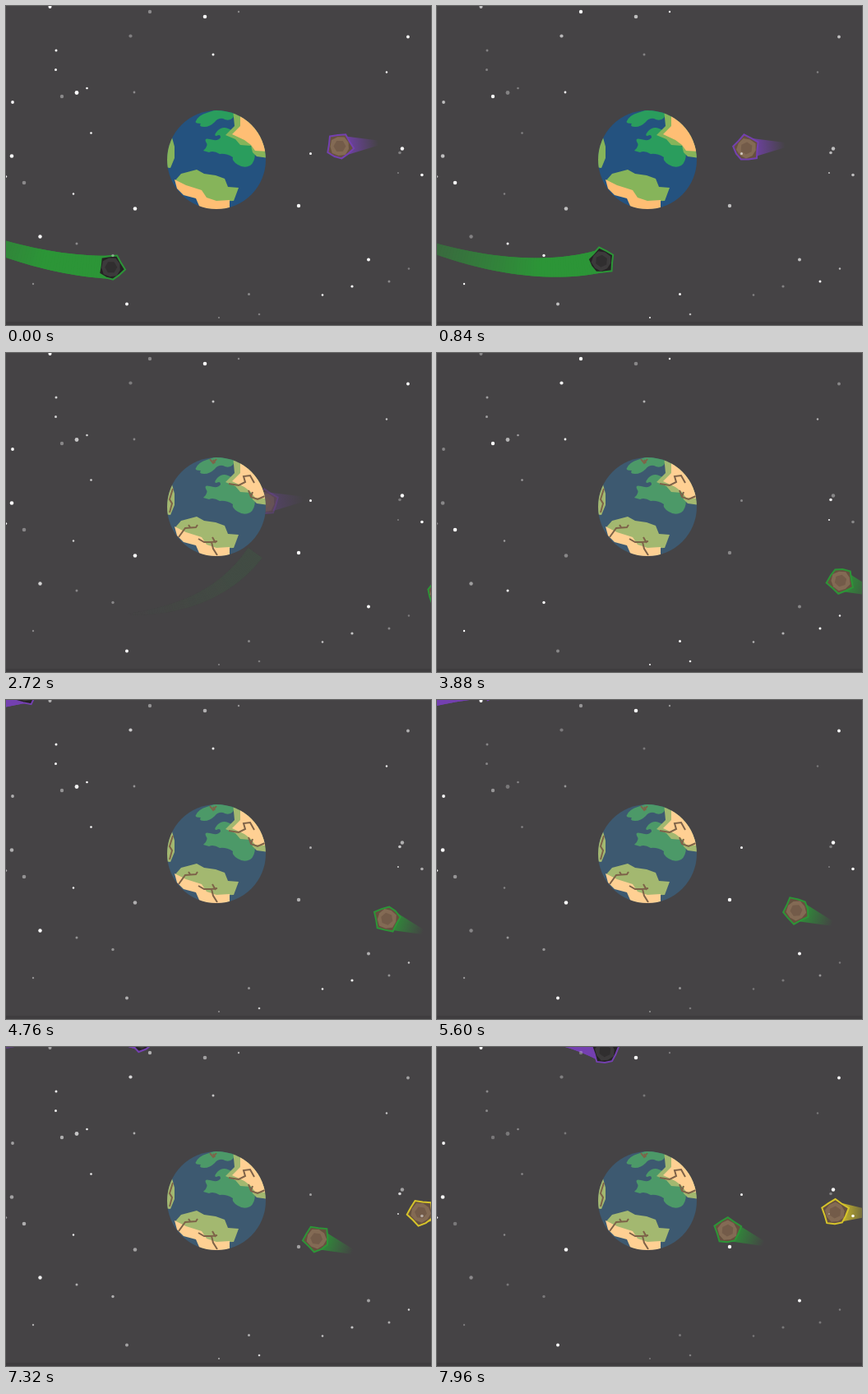
These frames come from a looping animation (517 px wide and 388 px high, 8 s). An HTML page with a canvas:

```html
<!DOCTYPE html>
<html lang="en">
<head>
<meta charset="utf-8">
<title>Asteroids and Earth</title>
<style>
  html, body { margin: 0; width: 100%; height: 100%; overflow: hidden; background: #454345; }
  canvas { display: block; width: 517px; height: 388px; }
</style>
</head>
<body>
<canvas id="stage" width="517" height="388"></canvas>
<script>
const ctx = document.getElementById('stage').getContext('2d');
const LOOP = 8000;
const SPACE = [69, 67, 69];
const GREEN = [44, 149, 55], PURPLE = [116, 64, 176], YELLOW = [214, 196, 42];
const DARK = ['#242223', '#3c3a3b', '#302e2f'];
const BROWN = ['#66503f', '#836a54', '#735b49'];

const clamp = v => Math.max(0, Math.min(1, v));
const ramp = (t, from, to) => clamp((t - from) / (to - from));
const lerp = (a, b, k) => a + (b - a) * k;
const mix = (a, b, k) => `rgb(${a.map((v, i) => Math.round(lerp(v, b[i], k)))})`;
const rgba = (c, a) => `rgba(${c},${a})`;

// Stars: groups share a twinkle; each star is [x, y, radius].
const starGroups = [
  { period: 2750, peak: 1050, stars: [[175, 7, 2.2], [283, 7, 1.2], [68, 110, 2.2], [156, 105, 1.4],
    [22, 215, 2.3], [86, 289, 1.5], [130, 303.5, 1.7], [33, 338, 1.2], [295.5, 350.5, 1.5],
    [466, 335, 1.5], [259, 379, 1]] },
  { period: 2650, peak: 200, stars: [[53.5, 1, 2], [242, 13, 2.3], [489, 37.5, 1.9], [8, 117, 1.9],
    [7, 182.5, 2.3], [157, 246.5, 2.3], [356, 243, 2.2], [482, 173.5, 2.2], [506, 205.5, 1.8],
    [441, 308.5, 2], [147, 362.5, 2], [370.5, 179.5, 1.5], [0, 207.5, 1.2]] },
  { period: 2400, peak: -150, stars: [[61, 54, 1.5], [60.5, 77.5, 1.5], [98.5, 100, 1.3],
    [103.5, 154.5, 1.3], [41.5, 280.5, 2.2], [82, 228.5, 1.2]] },
  { period: 2300, peak: -100, stars: [[252, 59, 1.5], [86, 105.5, 2.4], [463, 80.5, 1.2],
    [385, 351.5, 1.3], [421, 341, 1.6]] },
  { period: 2650, peak: 1525, stars: [[479, 178.5, 1.8], [477, 203, 1.1], [490, 319.5, 1.2],
    [308, 375, 1.3], [151.5, 36.5, 2.1]] }
];

function drawStars(t) {
  for (const { period, peak, stars } of starGroups) {
    const alpha = 0.64 + 0.36 * Math.cos((t - peak) / period * 2 * Math.PI);
    ctx.fillStyle = rgba([255, 255, 255], alpha);
    for (const [x, y, r] of stars) {
      ctx.beginPath();
      ctx.arc(x, y, r, 0, 7);
      ctx.fill();
    }
  }
}

// Earth: each land layer has a healthy and a damaged colour.
const OCEAN = [[36, 82, 127], [61, 89, 112]];
const FOREST = [[42, 157, 93], [76, 153, 104]];
const GRASS = [[134, 180, 90], [163, 184, 112]];
const SAND = [[255, 190, 116], [255, 208, 147]];
const land = [
  [FOREST, 'M231 140Q234 133 244 130L262 124L280 128L276 136Q271 141 264 137Q258 136 254 141Q248 147 241 147Q234 147 237 143Q229 143 231 140Z'],
  [FOREST, 'M240 176Q247 170 243 165Q241 160 248 162Q258 165 261 160Q261 155 256 158Q252 158 257 152Q263 146 270 149L279 153L296 168L303 178Q303 190 297 194Q290 198 282 193Q274 188 276 184Q268 179 260 180Q252 175 247 178Z'],
  [GRASS, 'M276 125L278 146L267 157L279 162L285 169L298 170L300 178L305 183L320 185L320 125Z'],
  [SAND, 'M285 125L285 146L275 156L290 163L298 169L303 176L320 177V125Z'],
  [GRASS, 'M202 160L205 171L205 185L200 197L192 196V165Z'],
  [GRASS, 'M206 212L213 204L232 199L241 204L255 206L266 210L270 220L283 221L277 237L246 238L222 224Z'],
  [SAND, 'M205 211L219 218L238 224L244 233L256 237L272 236L272 250L238 250L231 234L216 230L208 222Z']
].map(([tone, d]) => [tone, new Path2D(d)]);
const cracks = new Path2D('M271 159L283 161L291 157L289 150L297 149L302 158M295 167L298 175L306 178L315 174' +
  'M298 175L300 169M210 224L218 213L231 212L233 209M224 212L222 209M234 226L241 230L250 230L252 238L257 246' +
  'M250 230L257 229M251 224L255 231M203 165L199 178L202 183L199 194M248 129L252 134L256 129M252 130L254 134');

function drawEarth(t) {
  const damage = ramp(t, 1900, 2240);
  ctx.save();
  ctx.beginPath();
  ctx.arc(256, 187, 60, 0, 7);
  ctx.fillStyle = mix(...OCEAN, damage);
  ctx.fill();
  ctx.clip();
  for (const [tone, path] of land) {
    ctx.fillStyle = mix(...tone, damage);
    ctx.fill(path);
  }
  ctx.strokeStyle = rgba([126, 99, 73], ramp(t, 1880, 2060));
  ctx.lineWidth = 2;
  ctx.stroke(cracks);
  ctx.restore();
}

const ROCK_RADII = [18, 14.5, 17, 14, 18.5, 14.5, 16, 15, 17.5, 14];

function polygon(count, radius, turn) {
  ctx.beginPath();
  for (let i = 0; i < count; i++) {
    const a = turn + i / count * 2 * Math.PI;
    ctx.lineTo(radius(i) * Math.cos(a), radius(i) * Math.sin(a));
  }
  ctx.closePath();
}

function drawRock(x, y, t, tones, color, alpha = 1) {
  ctx.save();
  ctx.globalAlpha = alpha;
  ctx.translate(x, y);
  ctx.rotate(t * 0.042 * Math.PI / 180);
  ctx.lineWidth = 2;
  ctx.strokeStyle = rgba(color, 1);
  polygon(10, i => ROCK_RADII[i] * 0.94, -2.36);
  ctx.fillStyle = tones[0];
  ctx.fill();
  ctx.stroke();
  polygon(9, i => 11.5 + i % 2, 0.3);
  ctx.fillStyle = tones[1];
  ctx.fill();
  polygon(6, () => 7.5, 0);
  ctx.fillStyle = tones[2];
  ctx.fill();
  ctx.restore();
}

// Small asteroids drift along straight keyed paths with a short cone behind.
const drifters = [
  { color: PURPLE, tail: [47, -4], end: [2600, 2780],
    keys: [[0, 406, 170.5], [840, 376.5, 173], [2040, 337, 179], [2780, 313, 182]] },
  { color: GREEN, tail: [44, 16],
    keys: [[2440, 537, 295], [3880, 491, 277], [5600, 437, 256], [6560, 406.5, 245], [8000, 352, 222.5]] },
  { color: YELLOW, tail: [47, 1], keys: [[6300, 537, 202], [8000, 483, 201]] }
];

function along(keys, t) {
  const i = keys.findIndex(k => k[0] >= t);
  if (i < 0 || t < keys[0][0]) return null;
  const b = keys[i], a = keys[Math.max(0, i - 1)];
  const k = b === a ? 0 : (t - a[0]) / (b[0] - a[0]);
  return [lerp(a[1], b[1], k), lerp(a[2], b[2], k)];
}

function drawDrifter({ color, tail, keys, end }, t) {
  const pos = along(keys, t);
  if (!pos) return;
  const [x, y] = pos;
  const alpha = end ? 1 - ramp(t, ...end) : 1;
  const length = Math.hypot(...tail);
  ctx.save();
  ctx.globalAlpha = alpha;
  ctx.translate(x, y);
  ctx.rotate(Math.atan2(tail[1], tail[0]));
  const fade = ctx.createLinearGradient(8, 0, length, 0);
  fade.addColorStop(0, rgba(color, 0.9));
  fade.addColorStop(1, rgba(color, 0));
  ctx.fillStyle = fade;
  ctx.beginPath();
  ctx.moveTo(0, -13);
  ctx.lineTo(length, -3);
  ctx.lineTo(length, 3);
  ctx.lineTo(0, 13);
  ctx.fill();
  ctx.restore();
  drawRock(x, y, t, BROWN, color, alpha);
}

// Comets follow a cubic curve; progress is quadratic in time.
const comets = [
  { color: GREEN, curve: [[-170, 215], [0, 325], [215, 365], [303, 243]],
    start: 0, end: 3000, progress: t => 0.56 + 1.587e-4 * t + 2.795e-8 * t * t },
  { color: PURPLE, curve: [[-150, 50], [20, -28], [170, -55], [270, 55]],
    start: 3900, end: LOOP,
    progress: t => 0.45 + 1.2e-4 * (t - 5600) + 1.2e-8 * (t - 5600) ** 2 }
];

function curvePoint([a, b, c, d], u) {
  const v = 1 - u;
  return [0, 1].map(i =>
    v * v * v * a[i] + 3 * v * v * u * b[i] + 3 * v * u * u * c[i] + u * u * u * d[i]);
}

function drawComet({ color, curve, start, end, progress }, t) {
  if (t < start || t > end) return;
  const u = progress(t), head = Math.min(u, 1), tail = u - 0.6;
  const gone = start === 0 ? ramp(t, 2050, 2800) : 0;
  const steps = 90;
  const edge = i => {
    const at = lerp(tail, head, i / steps);
    const [x, y] = curvePoint(curve, at);
    const [nx, ny] = curvePoint(curve, at + 0.001);
    const len = Math.hypot(nx - x, ny - y);
    const half = 14 * clamp((at - tail) / 0.6) ** 0.7;
    const ox = -(ny - y) / len * half, oy = (nx - x) / len * half;
    return [x + ox, y + oy, x - ox, y - oy];
  };
  // Opaque slices overlap by one step, so no seams show.
  for (let i = 0; i < steps && tail < head; i++) {
    const a = edge(i), b = edge(Math.min(i + 2, steps));
    const strength = clamp(((i + 1) / steps) * 1.35) * (1 - gone);
    ctx.fillStyle = mix(SPACE, color, strength);
    ctx.beginPath();
    ctx.moveTo(a[0], a[1]);
    ctx.lineTo(b[0], b[1]);
    ctx.lineTo(b[2], b[3]);
    ctx.lineTo(a[2], a[3]);
    ctx.fill();
  }
  const alpha = start === 0 ? 1 - ramp(t, 1940, 2110) : 1;
  if (alpha > 0) drawRock(...curvePoint(curve, head), t, DARK, color, alpha);
}

function draw(t) {
  ctx.fillStyle = rgba(SPACE, 1);
  ctx.fillRect(0, 0, 517, 388);
  ctx.fillStyle = '#3f3d3f';
  ctx.fillRect(0, 384, 517, 4);
  comets.forEach(c => drawComet(c, t));
  drifters.forEach(d => drawDrifter(d, t));
  drawEarth(t);
  drawStars(t);
}

const begin = performance.now();
function tick() {
  draw((performance.now() - begin) % LOOP);
  requestAnimationFrame(tick);
}
tick();
</script>
</body>
</html>
```
